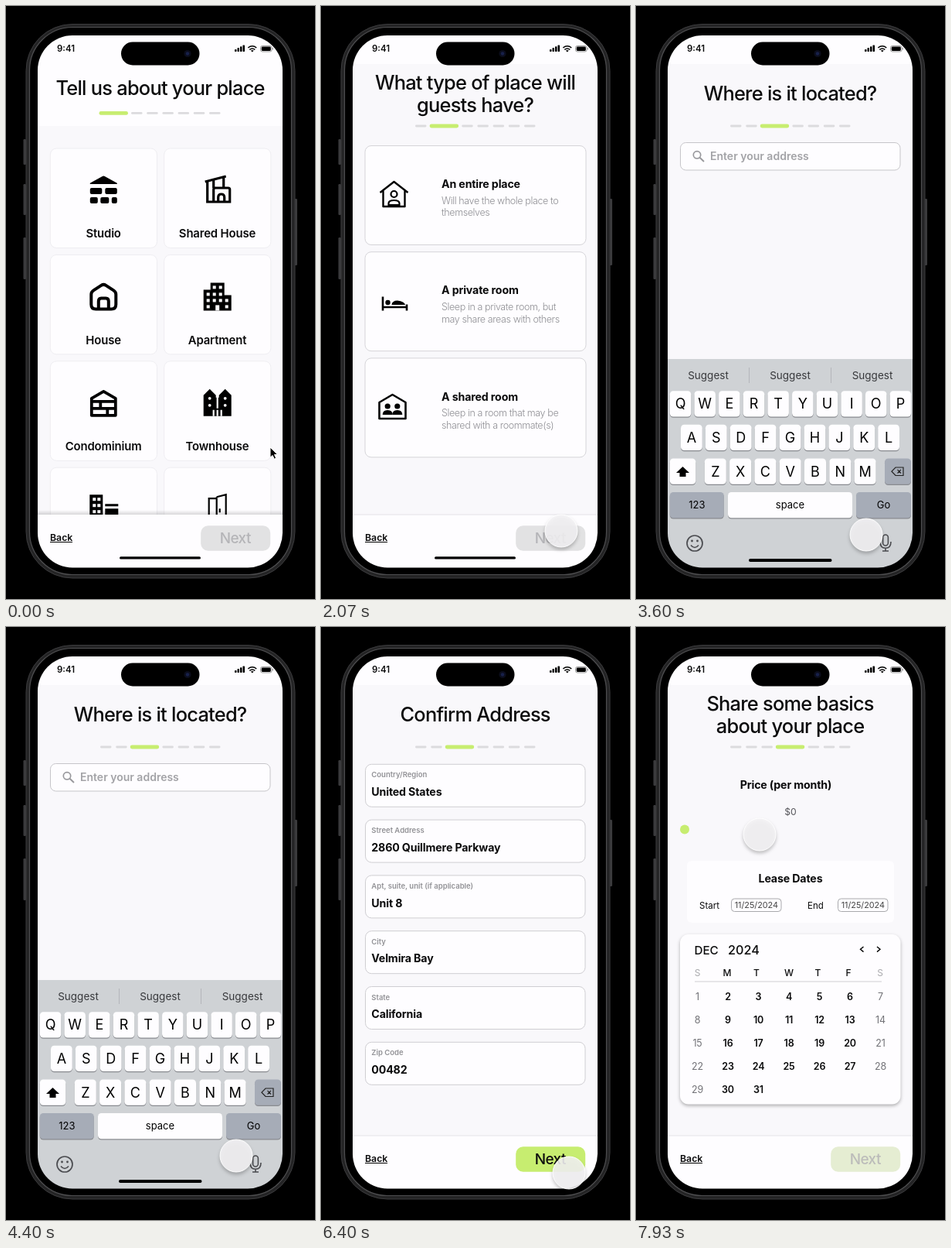
Write an HTML page that moves like this. It is 400x766 px and loops after 8 s.

```html
<!DOCTYPE html>
<html lang="en">
<head>
<meta charset="utf-8">
<title>Listing setup</title>
<style>
html, body { margin: 0; width: 100%; height: 100%; overflow: hidden; background: #000; }
svg { display: block; width: 400px; height: 766px; font-family: Inter, sans-serif; }

.page, .on, .off { animation: 8s step-end infinite; }
#p1 { animation-name: p1; }
#p2 { animation-name: p2; }
#p3 { animation-name: p3; }
#p4 { animation-name: p4; }
#p5 { animation-name: p5; }
@keyframes p1 { 0% { opacity: 1 } 19.7%, 100% { opacity: 0 } }
@keyframes p2 { 0% { opacity: 0 } 19.7% { opacity: 1 } 44.6%, 100% { opacity: 0 } }
@keyframes p3 { 0% { opacity: 0 } 44.6% { opacity: 1 } 72.3%, 100% { opacity: 0 } }
@keyframes p4 { 0% { opacity: 0 } 72.3% { opacity: 1 } 83.7%, 100% { opacity: 0 } }
@keyframes p5 { 0% { opacity: 0 } 83.7%, 100% { opacity: 1 } }

#p1 .on { animation-name: on1; }
#p2 .on { animation-name: on2; }
#p3 .on { animation-name: on3; }
#p3 .off { animation-name: off3; }
@keyframes on1 { 0% { opacity: 0 } 9.2%, 100% { opacity: 1 } }
@keyframes on2 { 0% { opacity: 0 } 34.1%, 100% { opacity: 1 } }
@keyframes on3 { 0% { opacity: 0 } 60%, 100% { opacity: 1 } }
@keyframes off3 { 0% { opacity: 1 } 60%, 100% { opacity: 0 } }

.typed {
  display: inline-block; height: 17px; border-right: 1.5px solid #111;
  font: 600 14.3px/17px Inter, sans-serif; color: #111; white-space: pre;
}
.typed::before { content: ""; animation: type 8s step-end infinite; }
@keyframes type {
  0% { content: "" } 60.3% { content: "U" } 61% { content: "US" } 61.7% { content: "USC" }
  62.4% { content: "USC " } 63.1% { content: "USC H" } 63.8% { content: "USC Ho" }
  64.5%, 100% { content: "USC Hou" }
}

#touch { animation: move 8s ease-in-out infinite; }
#arrow { animation: arrow 8s step-end infinite; }
#disc { animation: disc 8s step-end infinite; filter: drop-shadow(0 3px 2px rgba(0,0,0,.25)); }
@keyframes arrow { 0% { opacity: 1 } .6%, 100% { opacity: 0 } }
@keyframes disc { 0% { opacity: 0 } .6%, 100% { opacity: 1 } }
@keyframes move {
  0%, .5% { transform: translate(342px, 570px) }
  8.6% { transform: translate(138px, 268px) }
  11.6% { transform: translate(138px, 268px); animation-timing-function: ease-in }
  13.375% { transform: translate(182px, 350px); animation-timing-function: ease-out }
  18.5% { transform: translate(315px, 688px) }
  23.4% { transform: translate(314px, 686px); animation-timing-function: ease-in }
  25.875% { transform: translate(311px, 678px) }
  33%, 36.2% { transform: translate(113px, 255px) }
  42.8% { transform: translate(300px, 685px) }
  45%, 55.3% { transform: translate(298px, 683px) }
  59.5%, 66% { transform: translate(213px, 208px) }
  69.8%, 72.5% { transform: translate(190px, 288px) }
  79%, 83% { transform: translate(321px, 705px) }
  88.2% { transform: translate(318px, 697px) }
  99.125% { transform: translate(160px, 268px) }
  100% { transform: translate(157px, 267px) }
}
</style>
</head>
<body>
<svg id="stage" viewBox="0 0 400 766"></svg>
<script>
const GREEN = '#c7ed70', INK = '#0b0b0c', WHITE = '#fefdff', PALE = '#f9f8fb';

const text = (x, y, s, size, weight = 400, color = INK, anchor = 'start', gap = 0) =>
  `<text x="${x}" y="${y}" font-size="${size}" font-weight="${weight}" fill="${color}" text-anchor="${anchor}" letter-spacing="${gap}">${s}</text>`;
const mid = (x, y, s, size, weight, color, gap) => text(x, y, s, size, weight, color, 'middle', gap);
const bold = (x, y, s, anchor) => text(x, y, s, 14.2, 700, INK, anchor, -.15);
const box = (x, y, w, h, r, fill, stroke = 'none', more = '') =>
  `<rect x="${x}" y="${y}" width="${w}" height="${h}" rx="${r}" fill="${fill}" stroke="${stroke}" ${more}/>`;
const line = (d, width = 1, color = '#000', more = '') =>
  `<path d="${d}" fill="none" stroke="${color}" stroke-width="${width}" ${more}/>`;
const solid = (d, fill = '#000') => `<path d="${d}" fill="${fill}"/>`;
const dot = (x, y, r, fill = '#000', stroke = 'none') => `<circle cx="${x}" cy="${y}" r="${r}" fill="${fill}" stroke="${stroke}"/>`;
const group = (s, cls) => `<g class="${cls}">${s}</g>`;
const at = (x, y, s) => `<g transform="translate(${x} ${y})">${s}</g>`;
const each = (list, fn) => [...list].map(fn).join('');
const windows = (list, s, fill = WHITE) => each(list, ([x, y]) => box(x, y, s, s, 0, fill));

const title = (y, ...rows) => each(rows, (s, i) => mid(199.6, y + 29 * i, s, 25.4, 500, INK, -.75));

function steps(active, y) {
  return each(Array(7).keys(), i => {
    if (i === active) return box(120.5 + 20.1 * i, y - 2.4, 37.5, 4.8, 2.4, GREEN);
    const x = i < active ? 122 + 20.2 * i : 263 - 20.2 * (6 - i);
    return box(x, y - 1.4, 14.5, 2.8, 1.4, '#dcdbde');
  });
}

const next = (fill, color) => box(252.2, 671.2, 90, 32.6, 9.5, fill) + mid(296.7, 694.3, 'Next', 19, 500, color, -.6);
const nextOff = next('#e2e2e3', '#b5b5b8');
const nextOn = next(GREEN, INK);
const home = (x, y, w, h) => box(x, y, w, h, h / 2, '#000');
const homeBar = home(147, 711.2, 105, 3.4);

const footer = (button, shade) =>
  (shade ? box(41, 651, 317, 8, 0, 'url(#lift)') : '') +
  box(41, 657, 317, 70, 0, WHITE) +
  (shade ? '' : line('M41 657H358', 1, '#e4e3e7')) +
  text(57, 690.7, 'Back', 12.3, 600) + line('M57 692.5H86', 1) + button;

const backdrop = head => box(41, 38, 317, 690, 0, PALE) + box(41, 38, 317, head - 38, 0, WHITE);

// Icons are drawn around their own centre
const icons = [
  solid('M-1.5-18Q0-19 1.5-18L17-9.5Q18.5-8 16.5-8H-16.5Q-18.5-8-17-9.5Z') +
    each([[-17.5, -3, 15.5], [2, -3, 15.5], [-17.5, 9, 10], [-4, 9, 11], [10.5, 9, 7]], ([x, y, w]) => box(x, y, w, 8, 2, '#000')),
  line('M-16-11L11-18M-13-12V15H16V-1Q16-3 14-3H-3Q-5-3-5-1V15M8-17V-3M1 15V9Q1 5 5 5T9 9V15M-5-14V-3', 3.2),
  line('M-16-3Q-16-6-13-8L-3-14.5Q0-16.5 3-14.5L13-8Q16-6 16-3V10Q16 16 10 16H-10Q-16 16-16 10ZM-6.5 16V6Q-6.5 2-3 2H3Q6.5 2 6.5 6V16', 4),
  solid('M-9-18H9V-2H18V18H-18V-9H-9Z') +
    windows([[-6, -14], [2, -14], [-14, -5], [-6, -5], [2, -5], [-14, 3], [-6, 3], [2, 3], [10, 3], [-14, 11], [10, 11]], 4) +
    box(-2.5, 11, 5, 7, 0, WHITE),
  line('M-15.5-6L0-15L15.5-6V16H-15.5ZM-15.5-2H15.5M-15.5 7H15.5M-4-2V7M5 7V16', 3.8, '#000', 'stroke-linejoin="round"'),
  solid('M-18 17V-10L-10-18L-2-10V-7H2V-10L10-18L18-10V17Z') +
    each([[-10, -6], [10, -6], [-10, 3], [10, 3]], ([x, y]) => dot(x, y, 1.9, WHITE)) +
    line('M0-9V7M-5 17V9M0 17V9M5 17V9', 2.2, WHITE),
  solid('M-18-19H-1V18H-18ZM2-7H19V-4H2ZM2-1H19V18H2Z') +
    windows([[-14, -15], [-8, -15], [-14, -7], [-8, -7], [-14, 1], [-8, 1]], 4),
  line('M-11 18V-14H-1M-1-16L11-19V18M-1-16V18M3-1V4', 2.2)
];
const kinds = ['Studio', 'Shared House', 'House', 'Apartment', 'Condominium', 'Townhouse', '', ''];

function typePage() {
  const cards = each(kinds, (name, i) => {
    const x = 57.3 + 147.4 * (i % 2), y = 184 + 137.4 * (i >> 1);
    return box(x, y, 138.2, 128.5, 8, WHITE, '#eeedf1') +
      (i ? '' : box(x, y, 138.2, 128.5, 8, GREEN, 'none', 'class="on"')) +
      at(x + 69, y + 54, icons[i]) + mid(x + 68.8, y + 115.3, name, 14.9, 600, INK, -.15);
  });
  return backdrop(155) + title(115, 'Tell us about your place') + steps(0, 138.4) +
    cards + footer(nextOff + group(nextOn, 'on') + homeBar, true);
}

const person = (x, y) => dot(x, y, 3.6) + solid(`M${x - 6.5} ${y + 11}q0-6 6.5-6t6.5 6z`);
const stays = [
  ['An entire place', 'Will have the whole place to', 'themselves',
    at(94.5, 243, line('M-18-2L0-16L18-2M-14-5V16H14V-5', 2.4, '#000', 'stroke-linejoin="round"') +
      `<circle cy="0" r="4" fill="none" stroke="#000" stroke-width="2.2"/>` + line('M-7 14V12Q-7 8 0 8T7 12V14Z', 2.2))],
  ['A private room', 'Sleep in a private room, but', 'may share areas with others',
    at(95, 384.5, line('M-15-9V9M-15 4.5H16M16 9V1', 2.6) + dot(-8.5, -1.5, 3.2) + solid('M-3.5 1.5Q-3-4 4-4Q13-3 14 1.5Z'))],
  ['A shared room', 'Sleep in a room that may be', 'shared with a roommate(s)',
    at(92.5, 518, line('M-17-6L0-16L17-6V15H-17Z', 2.6, '#000', 'stroke-linejoin="round"') + person(-6.3, -1) + person(6.3, -1))]
];

function stayPage() {
  const cards = each(stays, ([name, a, b, icon], i) => {
    const y = 180.5 + 137.2 * i;
    const frame = (fill, more) => box(57, y, 286, 128, 8, fill, '#d5d4d8', more);
    return frame(WHITE) + (i ? '' : frame(GREEN, 'class="on"')) + icon + bold(156, y + 54.7, name) +
      text(156, y + 75.3, a, 12.5, 300, '#8f8f94', 'start', -.4) +
      text(156, y + 90.8, b, 12.5, 300, '#8f8f94', 'start', -.4);
  });
  return backdrop(75) + title(108, 'What type of place will', 'guests have?') + steps(1, 155) +
    cards + footer(nextOff + group(nextOn, 'on') + homeBar);
}

function key(x, y, w, label, size = 18, fill = WHITE) {
  return box(x, y + 1.2, w, 33.3, 4.5, '#898b90') + box(x, y, w, 33.3, 4.5, fill) +
    mid(x + w / 2, y + 16.7 + size * .36, label, size, 400, '#000');
}
const keyRow = (letters, x, y, pitch, w) => each(letters, (c, i) => key(x + pitch * i, y, w, c));

function keyboard() {
  const dim = '#a6acb7', grey = '#4b4c50';
  return box(41, 456, 317, 270, 0, '#cfd2d5') +
    each([93.5, 199.5, 306], x => mid(x, 482, 'Suggest', 13.5, 400, '#38393c')) +
    line('M146.5 467V487M252.5 467V487', 1, '#b4b6bb') +
    keyRow('QWERTYUIOP', 43.8, 497.3, 31.65, 27.5) +
    keyRow('ASDFGHJKL', 58, 540.8, 31.9, 27.8) +
    keyRow('ZXCVBNM', 88.8, 584.5, 32.3, 28) +
    key(43.8, 584.5, 33.5, '') + solid('M60.5 595L69 603H64.5V608H56.5V603H52Z') +
    key(322, 584.5, 34, '', 18, dim) +
    line('M331 601.2L336 596H346V606.5H336ZM338.5 598.8L343 603.5M343 598.8L338.5 603.5', 1.2, '#222') +
    key(43.8, 628, 70, '123', 13, dim) + key(119, 628, 161, 'space', 13) + key(285, 628, 71, 'Go', 13, dim) +
    at(76, 694, `<circle r="10" fill="none" stroke="${grey}" stroke-width="1.7"/>` + dot(-3.5, -3, 1.4, grey) + dot(3.5, -3, 1.4, grey) + line('M-5 2.5Q0 8.5 5 2.5', 1.6, grey)) +
    at(323, 693, box(-3.4, -10, 6.8, 14, 3.4, 'none', grey, 'stroke-width="1.6"') + line('M-7-1Q-7 7.3 0 7.3T7-1M0 7.3V11M-4 11H4', 1.6, grey)) +
    home(146, 714, 107.5, 4);
}

const street = 'Quillmere Parkway', city = 'Velmira Bay';

function searchPage() {
  const lens = color => `<circle cx="79" cy="192.3" r="4.7" fill="none" stroke="${color}" stroke-width="1.7"/>` + line('M82.5 195.8L88 201', 1.9, color);
  const field = stroke => box(57.5, 176.5, 284.5, 35.5, 7, WHITE, stroke);
  const idle = field('#c6c5c9') + lens('#98989c') + text(96, 199, 'Enter your address', 14, 600, '#a3a3a7');
  const results = each([2860, 2740, 2640], (no, i) => {
    const y = 251 + 75 * i;
    return box(57, y, 285, 66.5, 0, WHITE) +
      (i ? '' : line('M57 251H342', 1, '#cfced2')) + line(`M57 ${y + 66.5}H342`, 1, '#c9c8cc') +
      bold(73.5, y + 29.5, 'USC Housing') +
      text(73.5, y + 47, `${no} ${street}, ${city}`, 10.2, 600, '#9c9ca0');
  });
  const busy = field('#111') + lens(INK) +
    '<foreignObject x="96.5" y="185.5" width="220" height="20"><div class="typed"></div></foreignObject>' +
    bold(60.5, 237, 'Results') + results;
  return backdrop(75) + title(122, 'Where is it located?') + steps(2, 155) +
    group(idle, 'off') + group(busy, 'on') + keyboard();
}

const address = [
  ['Country/Region', 'United States'], ['Street Address', `2860 ${street}`],
  ['Apt, suite, unit (if applicable)', 'Unit 8'], ['City', city],
  ['State', 'California'], ['Zip Code', '00482']
];

function addressPage() {
  const fields = each(address, ([label, value], i) => {
    const y = 177.3 + 71.8 * i;
    return box(57.5, y, 284.5, 55, 8, WHITE, '#cfced2') +
      text(65.3, y + 17, label, 9.5, 600, '#929296') + bold(65.3, y + 40.6, value);
  });
  return backdrop(75) + title(122, 'Confirm Address') + steps(2, 155) + fields + footer(nextOn);
}

function basicsPage() {
  const date = x => box(x, 351, 64.5, 16.5, 4, WHITE, '#a9a9ad') + mid(x + 32.3, 363.2, '11/25/2024', 10.8, 400, '#444');
  const heads = each('SMTWTFS', (d, i) =>
    mid([79.5, 118, 156, 198, 235.5, 275, 316][i], 450.5, d, 12, i % 6 ? 500 : 400, i % 6 ? INK : '#a9a9ad'));
  const days = each(Array(31).keys(), i => {
    const c = i % 7, work = c % 6;
    return mid(79.5 + 39.5 * c, 481.5 + 30 * Math.floor(i / 7), i + 1, 12.5, work ? 600 : 400, work ? INK : '#727277', -.2);
  });
  return backdrop(75) + title(108, 'Share some basics', 'about your place') + steps(3, 155) +
    bold(194, 209, 'Price (per month)', 'middle') + mid(200, 243.3, '$0', 12.2, 400, '#55555a') +
    dot(63, 261.5, 6, GREEN) + box(66, 302, 268, 80, 6, WHITE) +
    bold(200, 330, 'Lease Dates', 'middle') +
    text(82, 363.5, 'Start', 11.5) + date(123.5) + text(222, 363.5, 'End', 11.5) + date(261.5) +
    box(57, 397, 285.5, 219.5, 11, WHITE, 'none', 'style="filter:drop-shadow(0 2px 2px rgba(0,0,0,.3))"') +
    text(75.5, 423, 'DEC', 15.2, 500) + text(119, 423, '2024', 16.2, 500) +
    line('M294.5 413L290.5 416.3L294.5 419.6M312 413L316 416.3L312 419.6', 1.4) +
    heads + line('M76 458H318', 1, '#cfced2') + days + footer(next('#e5edd2', '#bcbcba'));
}

const status = text(66, 59, '9:41', 11.4, 600) +
  each([3, 5, 6.7, 8.5], (h, i) => box(296 + 3.5 * i, 59 - h, 2.5, h, .7, '#000')) +
  line('M313.3 54Q318.8 49.6 324.3 54M315.3 56.4Q318.8 53.6 322.3 56.4', 1.6) + solid('M316.8 57.6Q318.8 56.2 320.8 57.6L318.8 59.6Z') +
  box(329.5, 51.5, 14.5, 7.5, 2.2, 'none', '#999') + box(330.7, 52.6, 12.1, 5.3, 1.3, '#000') + box(344.8, 53.8, 1.1, 2.8, .5, '#999') +
  box(149, 46.5, 101.5, 30, 15, '#000') + dot(235, 61.5, 4.6, '#0b0d1c') + dot(235, 61.5, 2.2, '#17204a');

const phone = each([[22.5, 172, 33], [22.5, 230, 40], [22.5, 299, 54], [373.5, 249, 86]],
    ([x, y, h]) => box(x, y, 3.5, h, 1.2, '#3a3a3c')) +
  box(26, 23.5, 348, 715.5, 60, '#242425', '#3c3c3e') +
  box(30.5, 27.5, 339, 707, 55.5, '#000', '#4e4e50', 'stroke-width="1.2"');

const arrow = '<path id="arrow" d="M0 0V13.2L3.1 10.5L5.3 15.2L7.6 14.1L5.5 9.5H9.6Z" fill="#000" stroke="#fff"/>';
const disc = `<g id="disc">${dot(0, 0, 21, 'rgba(244,243,245,.88)', 'rgba(255,255,255,.9)')}</g>`;

const pages = [typePage, stayPage, searchPage, addressPage, basicsPage];
document.getElementById('stage').innerHTML =
  '<defs><clipPath id="screen"><rect x="41" y="38" width="317" height="687.5" rx="45"/></clipPath>' +
  '<linearGradient id="lift" x2="0" y2="1"><stop stop-color="#000" stop-opacity="0"/><stop offset="1" stop-color="#000" stop-opacity=".2"/></linearGradient></defs>' +
  phone + '<g clip-path="url(#screen)">' +
  each(pages, (page, i) => `<g id="p${i + 1}" class="page">${page()}</g>`) + status + '</g>' +
  `<g id="touch">${arrow}${disc}</g>`;
</script>
</body>
</html>
```
